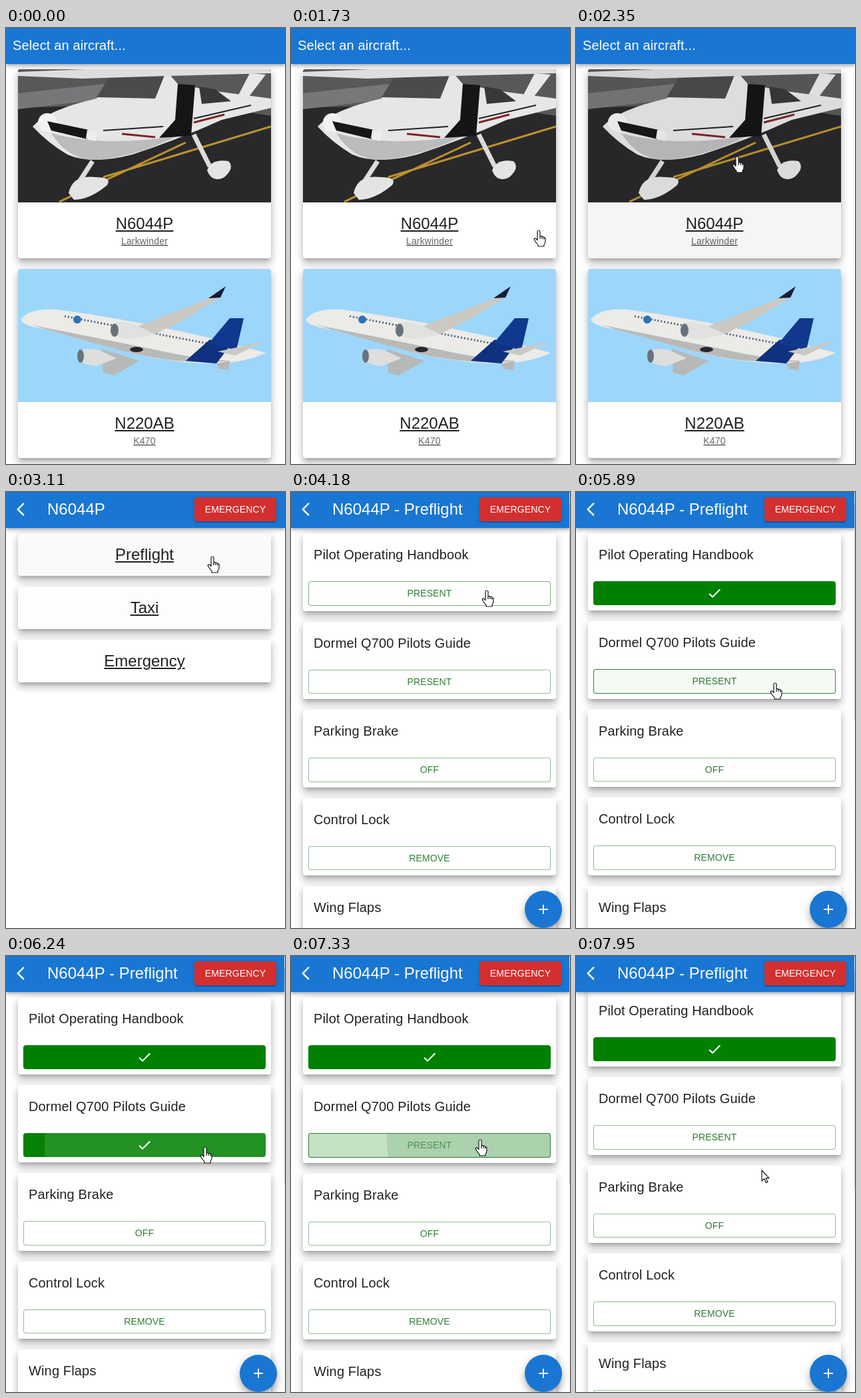
Animation, 419 px wide and 655 px high, one loop 8 s. Source, as an HTML page:

```html
<!DOCTYPE html>
<html lang="en">
<head>
<meta charset="utf-8">
<title>Aircraft checklists</title>
<style>
html, body { margin: 0; width: 100%; height: 100%; overflow: hidden; background: #fff; }
body { position: relative; font-family: "Liberation Sans", Arial, sans-serif; color: #212121; }
.page { position: absolute; inset: 0; }
.list { position: absolute; left: 18px; top: 62px; width: 380px; }
.card { position: relative; margin-bottom: 16px; border-radius: 4px; background: #fff; overflow: hidden; text-align: center; }
.card, .fab {
  box-shadow: 0 5px 5px -3px rgba(0,0,0,.2), 0 8px 10px 1px rgba(0,0,0,.14), 0 3px 14px 2px rgba(0,0,0,.12);
}
.card .tint { position: absolute; inset: 0; background: #000; opacity: 0; }
.photo { display: block; width: 380px; height: 200px; }
.link { padding: 16px; text-decoration: underline; }
.link b { display: block; font: 24px/32px "Liberation Sans", Arial, sans-serif; }
.link small { display: block; font-size: 14px; line-height: 20px; letter-spacing: .15px; color: #666; }
.row { padding: 0 8px 8px; text-align: left; }
.row h2 { margin: 0; padding: 16px 8px 24px; font-size: 20px; font-weight: 400; line-height: 32px; letter-spacing: .15px; }
.btn { position: relative; display: flex; align-items: center; justify-content: center; height: 36.5px;
  border-radius: 4px; overflow: hidden; font-size: 14px; letter-spacing: .13px; }
.btn svg { position: absolute; left: 170px; top: 6px; }
.ripple { position: absolute; border-radius: 50%; }
.bar { position: absolute; left: 0; top: 0; width: 100%; height: 54px; background: #1976d2; color: #fff; line-height: 52px;
  box-shadow: 0 2px 4px -1px rgba(0,0,0,.2), 0 4px 5px rgba(0,0,0,.14), 0 1px 10px rgba(0,0,0,.12); }
.bar span { position: absolute; left: 62px; font-size: 24px; white-space: nowrap; }
.bar .first { left: 10px; font-size: 20px; letter-spacing: .15px; }
.bar svg { position: absolute; left: 10px; top: 14px; }
.alarm { position: absolute; left: 283px; top: 8px; width: 123px; height: 36px; border-radius: 4px; background: #d32f2f;
  text-align: center; font-size: 14px; line-height: 36px; letter-spacing: .13px;
  box-shadow: 0 3px 1px -2px rgba(0,0,0,.2), 0 2px 2px rgba(0,0,0,.14), 0 1px 5px rgba(0,0,0,.12); }
.fab { position: absolute; left: 351px; top: 599px; width: 56px; height: 56px; border-radius: 50%; background: #1976d2; }
.fab svg { position: absolute; left: 16px; top: 16px; }
.track { position: absolute; left: 418px; top: 0; width: 1px; height: 655px; background: #f1f1f1; }
.thumb { position: absolute; top: 17px; width: 1px; height: 326px; background: #c1c1c1; }
#cursor { position: absolute; left: 0; top: 0; overflow: visible; }
</style>
</head>
<body>
<div class="page">
  <div class="list">
    <div class="card">
      <svg class="photo" viewBox="0 0 380 200">
        <rect width="380" height="200" fill="#29292b"/>
        <path d="M0 0H380V70L250 50 0 58z" fill="#585856"/>
        <path d="M0 36L130 22 120 46 0 60z" fill="#77777a"/>
        <path d="M62 199L252 110M128 162L380 86" stroke="#bd9230" stroke-width="3"/>
        <path d="M348 6L322 56 334 58 372 8z" fill="#e8e8e8"/>
        <path d="M22 86Q46 60 118 44L146 6H226L240 22 290 32 380 44V58L306 76Q240 106 172 128 110 144 74 128 44 110 22 86z" fill="#e6e6e7"/>
        <path d="M50 96Q130 118 240 100 180 130 120 136 76 138 50 96z" fill="#bcbcbf"/>
        <path d="M118 42L142 4H222L206 44z" fill="#4b4b4b"/>
        <path d="M240 22L266 24 260 100 212 103 236 76z" fill="#151516"/>
        <path d="M272 26L296 30 320 48 276 52z" fill="#383839"/>
        <path d="M128 92L218 86M264 74L350 54" stroke="#222" stroke-width="2"/>
        <path d="M156 97L206 102M264 80L310 68" stroke="#7c2626" stroke-width="3"/>
        <path d="M0 4L100 0H380V6L224 10 96 14 0 10z" fill="#dededf"/>
        <circle cx="44" cy="80" r="14" fill="#f2f2f2"/>
        <path d="M44 78L106 91 104 105 50 92z" fill="#171718"/>
        <path d="M104 91L118 94 116 108 102 104z" fill="#eee"/>
        <path d="M112 138L90 172M264 98L288 146" stroke="#dcdcdc" stroke-width="7"/>
        <path d="M76 186Q82 158 116 162 142 162 134 174 108 196 84 196z" fill="#e4e4e5"/>
        <path d="M284 152Q290 134 316 138 326 148 310 162 292 172 284 152z" fill="#e4e4e5"/>
      </svg>
      <div class="link"><b>N6044P</b><small>Larkwinder</small></div>
      <div class="tint"></div>
    </div>
    <div class="card">
      <svg class="photo" viewBox="0 0 380 200">
        <rect width="380" height="200" fill="#9dd6fb"/>
        <path d="M126 120L182 138 144 160 128 156z" fill="#b6b9b8"/>
        <path d="M4 76Q18 58 60 61 170 76 290 104L372 126Q344 140 300 142 230 142 160 124 90 104 40 90 8 86 4 76z" fill="#ecebe7"/>
        <path d="M20 84Q120 104 200 120 270 136 320 138 250 146 160 124 80 102 20 84z" fill="#b9bab8"/>
        <path d="M70 71L290 113" stroke="#4d6480" stroke-width="3" stroke-dasharray="2 3"/>
        <path d="M252 138L288 106 318 116 298 142z" fill="#10317f"/>
        <path d="M286 112L318 74 339 74 328 122z" fill="#10388e"/>
        <path d="M300 124L370 109 326 130z" fill="#c9c8c4"/>
        <path d="M298 142L318 138 316 152 302 150z" fill="#b7b7b4"/>
        <path d="M180 86L288 44 312 26 302 44 256 72 206 98z" fill="#cbc9c1"/>
        <path d="M286 44L312 26 304 43z" fill="#151c3c"/>
        <path d="M140 86Q150 74 176 84L206 98 168 106Q140 104 140 86z" fill="#e1e1df"/>
        <path d="M90 128Q96 116 122 122L148 134 118 146Q90 144 90 128z" fill="#dededc"/>
        <ellipse cx="145" cy="92" rx="6" ry="10" fill="#68727c"/>
        <ellipse cx="94" cy="131" rx="5" ry="10" fill="#68727c"/>
        <ellipse cx="178" cy="121" rx="10" ry="4" fill="#24272c"/>
        <circle cx="89" cy="76" r="6" fill="#2c72b8"/>
      </svg>
      <div class="link"><b>N220AB</b><small>K470</small></div>
    </div>
  </div>
</div>
<div class="page"><div class="list" id="menu"></div></div>
<div class="page"><div class="list" id="rows"></div></div>

<div class="bar">
  <span class="first">Select an aircraft...</span>
  <div id="nav">
    <svg width="24" height="24" fill="#fff"><path d="M17.77 3.77 16 2 6 12l10 10 1.77-1.77L9.54 12z"/></svg>
    <span id="title"></span>
    <div class="alarm">EMERGENCY</div>
  </div>
</div>
<div id="extras">
  <div class="fab"><svg width="24" height="24" fill="#fff"><path d="M19 13h-6v6h-2v-6H5v-2h6V5h2v6h6v2z"/></svg></div>
  <div class="track"><div class="thumb"></div></div>
</div>
<svg id="cursor" width="1" height="1" fill="#fff" stroke="#15151f" stroke-width="1.2" stroke-linejoin="round">
  <path id="hand" d="M-2 15V2a2 2 0 0 1 4 0v7q2.4-1.2 3 .8 2.4-1 2.8 1 2-.4 2.2 1.8v4q0 3-2 5v2.4h-9v-2.4q-2.4-2-5-6.6-1.4-2 0-3 1.6-1 4 3M2 9v4M5 9.8v3.2M7.8 10.8v2.6"/>
  <path id="arrow" d="M0 0V16L3.7 12.6 6.3 18.6 8.8 17.5 6.2 11.6H11z"/>
</svg>

<script>
const LOOP = 8000, MENU = 2420, CHECKLIST = 3570, SCROLL = 7950;
const $ = s => document.querySelector(s);
const $$ = s => [...document.querySelectorAll(s)];
const clamp = x => Math.min(1, Math.max(0, x));
const mix = (a, b, k) => a + (b - a) * k;
const show = (el, on) => el.style.display = on ? "" : "none";

// cubic-bezier(.4, 0, .2, 1)
function ease(x) {
  x = clamp(x);
  let lo = 0, hi = 1, s = x;
  for (let i = 0; i < 18; i++) {
    s = (lo + hi) / 2;
    const r = 1 - s;
    if (1.2 * r * r * s + .6 * r * s * s + s * s * s < x) lo = s; else hi = s;
  }
  return 3 * (1 - s) * s * s + s * s * s;
}

$("#menu").innerHTML = ["Preflight", "Taxi", "Emergency"].map(name =>
  `<div class="card"><div class="link"><b>${name}</b></div><div class="tint"></div></div>`).join("");

const items = [
  ["Pilot Operating Handbook", "PRESENT"],
  ["Dormel Q700 Pilots Guide", "PRESENT"],
  ["Parking Brake", "OFF"],
  ["Control Lock", "REMOVE"],
  ["Wing Flaps", "UP"]
];
$("#rows").innerHTML = items.map(([name, action]) =>
  `<div class="card row"><h2>${name}</h2><div class="btn"><span>${action}</span>
  <svg width="24" height="24" fill="#fff"><path d="M9 16.17 4.83 12l-1.42 1.41L9 19 21 7l-1.41-1.41z"/></svg>
  <i class="ripple"></i></div></div>`).join("");

const pages = $$(".page"), tints = $$(".tint");
const buttons = $$(".btn").map(el => ({
  el, label: el.querySelector("span"), tick: el.querySelector("svg"), ripple: el.querySelector("i")
}));

// Pointer stops: time, x, y
const path = [
  [1730, 372, 304], [1940, 242, 193], [2830, 242, 193], [3110, 310, 97], [3240, 310, 97],
  [3310, 306, 89], [3970, 306, 89], [4180, 294, 148], [5350, 294, 148], [5420, 294, 146],
  [5840, 299, 287], [6380, 299, 287], [6660, 284, 276], [7500, 284, 276], [7750, 279, 322]
];
// Hover spans
const cardHover = [[1730, MENU], [3025, CHECKLIST], [MENU, 2980]];
const rowHover = [[4120, 5490], [5715, 7655]];
// Clicks: press, release, x, y inside the button
const clicks = [
  [[4795, 4890, 268, 14]],
  [[5910, 6035, 273, 21], [7130, 7200, 258, 10]]
];

const hoverLevel = (t, [from, to]) => ease((t - from) / 250) - ease((t - to) / 250);

function drawButton({ el, label, tick, ripple }, i, t) {
  const done = (clicks[i] || []).filter(c => t >= c[1]);
  const on = done.length % 2 === 1;
  const turn = done.length ? ease((t - done.at(-1)[1]) / 250) : 1;
  const hover = rowHover[i] ? hoverLevel(t, rowHover[i]) : 0;
  const fill = on ? turn : done.length ? 1 - turn : 0;
  el.style.height = on ? "36px" : "36.5px";
  el.style.backgroundColor = `rgba(0,128,0,${mix(.04 * hover, 1, fill)})`;
  el.style.boxShadow = on ? "none" : `inset 0 0 0 1px rgba(46,125,50,${.5 + .5 * hover})`;
  show(label, !on);
  show(tick, on);
  label.style.color = `rgb(${[46, 125, 50].map(c => mix(255, c, on ? 1 : turn))})`;

  const click = (clicks[i] || []).filter(c => t >= c[0]).at(-1);
  show(ripple, click);
  if (!click) return;
  const [press, release, x, y] = click;
  const grow = ease((t - press) / 550);
  const r = Math.hypot(Math.max(x, 364 - x) + 1, Math.max(y, 36 - y) + 1) * grow;
  Object.assign(ripple.style, {
    left: x - r + "px", top: y - r + "px", width: 2 * r + "px", height: 2 * r + "px",
    background: on ? "#fff" : "#2e7d32",
    opacity: (.1 + .2 * grow) * (1 - ease((t - release) / 550))
  });
}

function drawCursor(t) {
  show($("#cursor"), t >= path[0][0]);
  const n = path.findIndex(p => p[0] > t);
  const b = n < 0 ? path.at(-1) : path[n], a = n > 0 ? path[n - 1] : b;
  const k = a === b ? 0 : (t - a[0]) / (b[0] - a[0]), s = k * k * (3 - 2 * k);
  $("#cursor").style.transform = `translate(${mix(a[1], b[1], s)}px,${mix(a[2], b[2], s)}px)`;
  const over = [...cardHover, ...rowHover].some(h => t >= h[0] && t < h[1]);
  show($("#hand"), over);
  show($("#arrow"), !over);
}

function draw(t) {
  const page = t < MENU ? 0 : t < CHECKLIST ? 1 : 2;
  pages.forEach((p, i) => show(p, i === page));
  show($(".first"), page === 0);
  show($("#nav"), page > 0);
  show($("#extras"), page === 2);
  $("#title").textContent = page === 2 ? "N6044P - Preflight" : "N6044P";
  cardHover.forEach((h, i) => tints[i].style.opacity = .04 * hoverLevel(t, h));
  buttons.forEach((b, i) => drawButton(b, i, t));
  const scrolled = t >= SCROLL;
  $("#rows").style.top = scrolled ? "50px" : "62px";
  $(".thumb").style.top = scrolled ? "23px" : "17px";
  drawCursor(t);
}

const start = performance.now();
function tick() {
  draw((performance.now() - start) % LOOP);
  requestAnimationFrame(tick);
}
tick();
</script>
</body>
</html>
```
